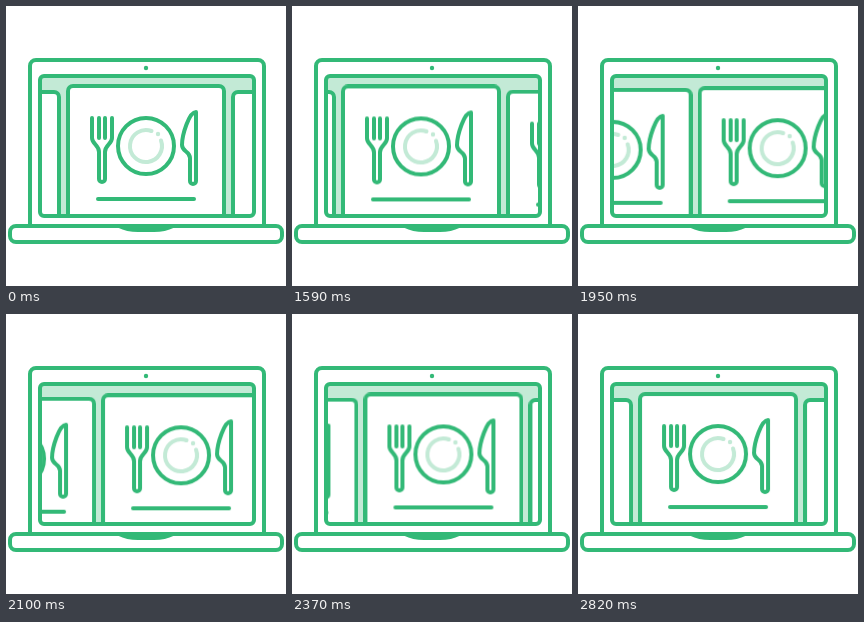
An HTML page that plays this animation: 280x280 px, repeating every 2850 ms.

```html
<!DOCTYPE html>
<html lang="en">
<head>
<meta charset="utf-8">
<title>Menu slider</title>
<style>
  html, body { margin: 0; width: 100%; height: 100%; overflow: hidden; background: #fff; }
  svg { display: block; width: 100%; height: 100%; }
  .line { stroke: #33b977; stroke-width: 4; stroke-linecap: round; stroke-linejoin: round; fill: none; }
  .paper { fill: #fff; }
  .solid { fill: #33b977; }
  .tint { fill: #c3ead6; }
  .shine { stroke: #c3ead6; }
</style>
</head>
<body>
<svg viewBox="0 0 280 280">
  <defs>
    <clipPath id="screen"><rect x="34" y="70" width="214" height="140" rx="4"/></clipPath>
    <g id="card" class="line">
      <rect class="paper" x="62" y="80" width="156" height="160" rx="5"/>
      <!-- fork -->
      <path d="M86 112V132C86 138 93 139 93 146V173a3 3 0 0 0 6 0V146C99 139 106 138 106 132V112M93 112V132M99 112V132"/>
      <!-- plate -->
      <circle cx="140" cy="140" r="28"/>
      <path class="shine" d="M155 134.5A16 16 0 1 1 145.5 125"/>
      <circle class="tint" cx="152" cy="128" r="2.2" stroke="none"/>
      <!-- knife -->
      <path d="M190 106C183 106 176 129 176 139C176 146 184 145 184 152V175a3 3 0 0 0 6 0Z"/>
      <path d="M92 193H188"/>
    </g>
  </defs>

  <path class="line" d="M24 220V60a6 6 0 0 1 6-6H252a6 6 0 0 1 6 6V220"/>
  <circle class="solid" cx="140" cy="62" r="2.2"/>
  <g clip-path="url(#screen)">
    <rect class="tint" x="34" y="70" width="214" height="140"/>
    <g id="track"></g>
  </g>
  <rect class="line" x="34" y="70" width="214" height="140" rx="4"/>
  <rect class="line paper" x="4" y="220" width="272" height="16" rx="6"/>
  <path class="line solid" d="M113 220C118 222.5 124 224 132 224H148C156 224 162 222.5 167 220Z"/>
</svg>
<script>
  const LOOP = 2850, HOLD = 1410, PITCH = 165, DROP = 6;
  const EASE = 'cubic-bezier(.333, 0, .16, 1)';
  const track = document.getElementById('track');

  // Cards away from the centre slot sit slightly lower.
  const place = slot =>
    `translate(${slot * PITCH}px, ${Math.min(1, Math.abs(slot)) * DROP}px)`;

  for (const slot of [-1, 0, 1, 2]) {
    const card = document.createElementNS('http://www.w3.org/2000/svg', 'use');
    card.setAttribute('href', '#card');
    track.append(card);
    card.animate([
      { offset: 0, transform: place(slot) },
      { offset: HOLD / LOOP, transform: place(slot), easing: EASE },
      { offset: 1, transform: place(slot - 1) }
    ], { duration: LOOP, iterations: Infinity });
  }
</script>
</body>
</html>
```
